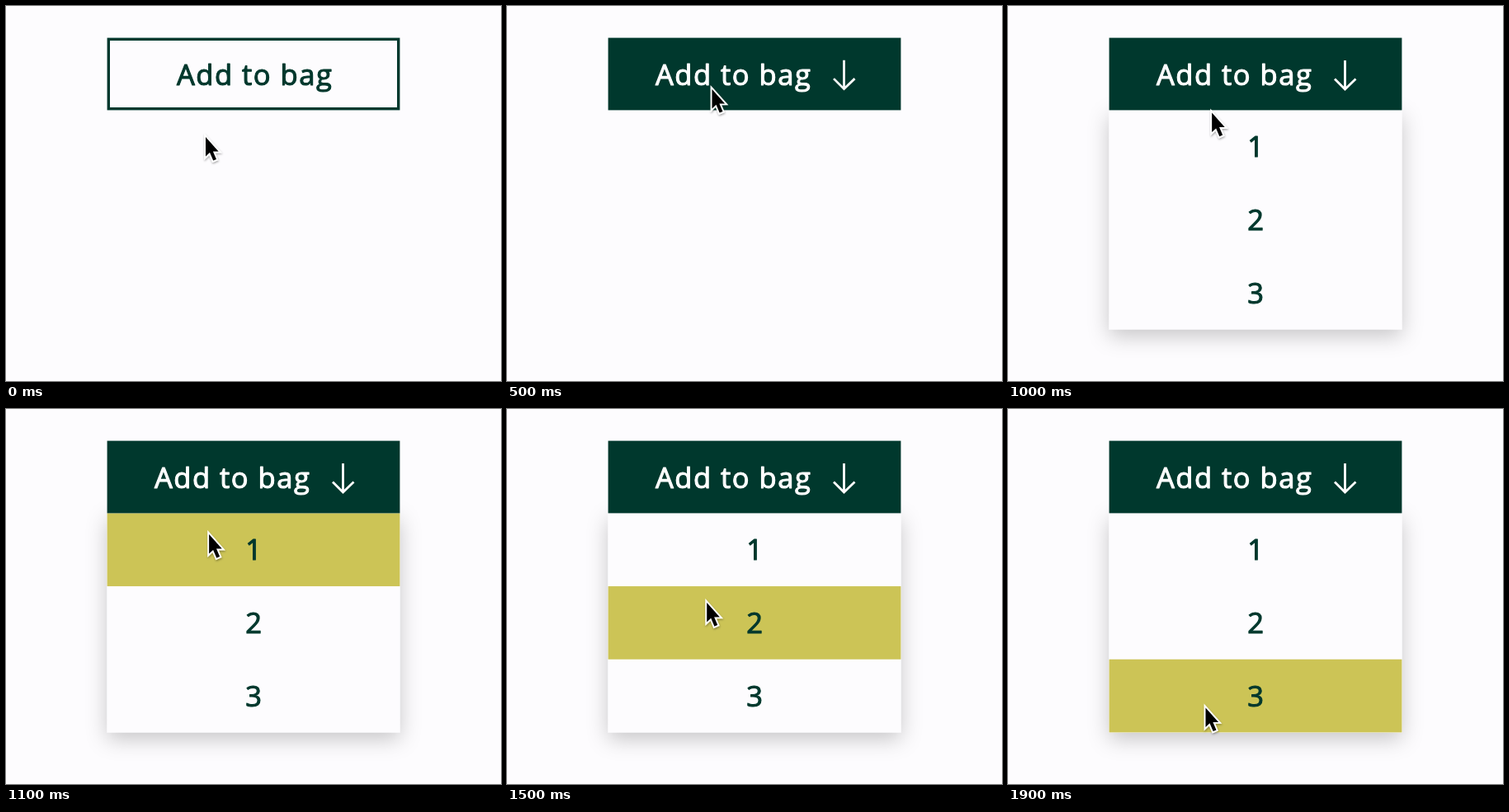
Recreate the animation shown at these times as an HTML page. Size 600 px wide and 455 px high, loop 2300 ms.

```html
<!DOCTYPE html>
<html lang="en">
<head>
<meta charset="utf-8">
<title>Add to bag</title>
<style>
  html, body { margin: 0; width: 100%; height: 100%; overflow: hidden; background: #fdfcfe; }
  svg { display: block; width: 100%; height: 100%; }
  text { font: 400 34.5px "Open Sans", sans-serif; stroke-width: 1.1px; stroke-linejoin: round; }
  #label { letter-spacing: 1.5px; }
</style>
</head>
<body>
<svg viewBox="0 0 600 455">
  <defs>
    <filter id="lift" x="-20%" y="-20%" width="140%" height="150%">
      <feDropShadow dx="0" dy="8" stdDeviation="13" flood-color="#000" flood-opacity=".22"/>
    </filter>
    <filter id="soft" x="-40%" y="-30%" width="190%" height="170%">
      <feDropShadow dx="0.5" dy="1.5" stdDeviation="1.3" flood-color="#000" flood-opacity=".35"/>
    </filter>
  </defs>
  <g id="panel">
    <rect x="122.6" y="126.4" width="354.8" height="266" fill="#fdfcfe" filter="url(#lift)"/>
    <rect id="mark" x="122.6" width="354.8" fill="#ccc456"/>
    <g fill="#00382d" stroke="#00382d" text-anchor="middle">
      <text x="300" y="183">1</text>
      <text x="300" y="272">2</text>
      <text x="300" y="361">3</text>
    </g>
  </g>
  <rect id="button" x="124.3" y="40.3" width="351.4" height="84.4" stroke="#00382d" stroke-width="3.4"/>
  <text id="label" y="96">Add to bag</text>
  <path id="arrow" d="M408.5 66V100M396 88.5L408.5 101L421.5 88.5" fill="none" stroke="#fff" stroke-width="2.8"/>
  <path id="cursor" d="M0 0V23.5L5 18.8L9.2 28.6L13 27L8.9 17.4H15.6Z" fill="#000"
        stroke="#fff" stroke-width="3.8" paint-order="stroke" filter="url(#soft)"/>
</svg>
<script>
const LOOP = 2300, STEP = 100;
const TOP = 126.4, ROW = 266 / 3, HOVER_LAG = 50;
const DARK = [0, 56, 45], LIGHT = [253, 252, 254];

const span = (t, start, length) => Math.min(1, Math.max(0, (t - start) / length));
const easeOut = k => 1 - (1 - k) ** 3;
const smooth = k => k * k * (3 - 2 * k);
const appear = (t, start) => easeOut(span(t, start, 450));
const mix = (a, b, k) => `rgb(${a.map((v, i) => Math.round(v + (b[i] - v) * k))})`;

function set(id, attrs) {
  const node = document.getElementById(id);
  for (const name in attrs) node.setAttribute(name, attrs[name]);
}

// Three glides: up to the button, down the list, flick to the last row.
function pointer(t) {
  const up = easeOut(span(t, 0, 400));
  const down = smooth(span(t, 755, 840));
  const flick = easeOut(span(t, 1700, 130));
  return {
    x: 242 + 6.5 * up - 6.5 * down - 2.5 * flick,
    y: 159 - 58 * up + 139 * down + 122.5 * flick
  };
}

function draw(t) {
  const hover = span(t, 60, 140);
  const slide = appear(t, 60), arrow = appear(t, 200), open = appear(t, 600);
  const row = Math.floor((pointer(t - HOVER_LAG).y - TOP) / ROW);
  const { x, y } = pointer(t);
  const ink = mix(DARK, [255, 255, 255], hover);

  set("button", { fill: mix(LIGHT, DARK, hover) });
  set("label", { fill: ink, stroke: ink, x: 207 - 27 * slide });
  set("arrow", { opacity: arrow, transform: `translate(0 ${10 * (arrow - 1)})` });
  set("panel", { opacity: open, transform: `translate(0 ${6 * (open - 1)})` });
  set("mark", { y: TOP + ROW * row, height: row < 0 ? 0 : ROW });
  set("cursor", { transform: `translate(${x} ${y})` });
}

const start = performance.now();
function tick() {
  const t = (performance.now() - start) % LOOP;
  draw(Math.floor(t / STEP) * STEP);
  requestAnimationFrame(tick);
}
tick();
</script>
</body>
</html>
```
